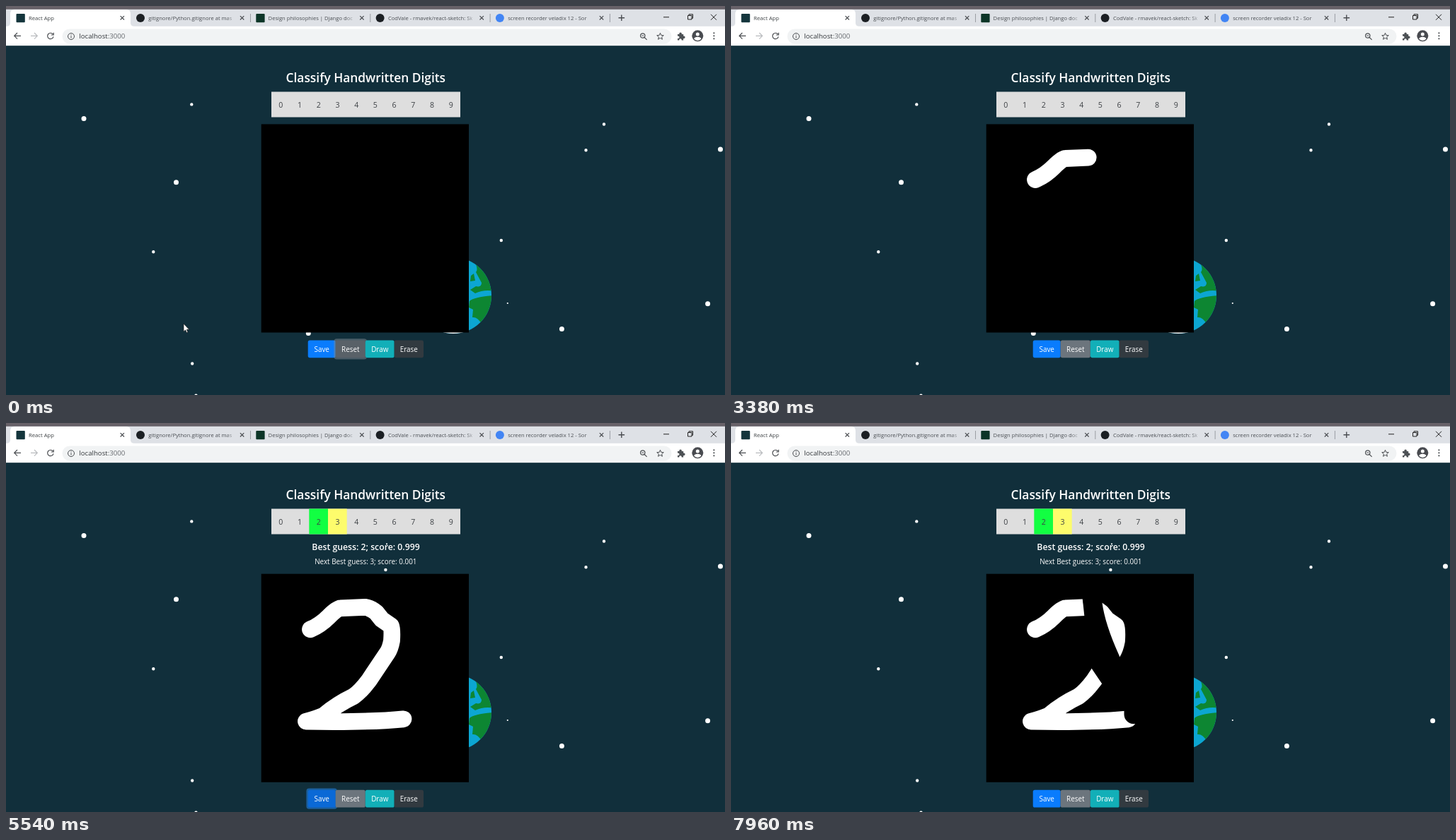
An HTML page that plays this animation: 1016x551 px, repeating every 8 s.

```html
<!DOCTYPE html>
<html lang="en">
<head>
<meta charset="utf-8">
<title>Digit classifier</title>
<style>
  html, body { margin: 0; width: 100%; height: 100%; overflow: hidden; background: #112f3b; }
  svg { display: block; width: 100%; height: 100%; }
  text { font-family: "Open Sans", "Noto Sans", sans-serif; white-space: pre; }
  .mid { text-anchor: middle; }
  .line { fill: none; stroke: #4a4d51; stroke-width: 1.2; }
  .dots { stroke: #fff; stroke-linecap: round; }
</style>
</head>
<body>
<svg viewBox="0 0 1016 551" xmlns="http://www.w3.org/2000/svg">
  <defs>
    <linearGradient id="fade">
      <stop offset="0" stop-color="#dee1e6" stop-opacity="0"/>
      <stop offset=".75" stop-color="#dee1e6"/>
    </linearGradient>
    <clipPath id="globe"><circle cx="632" cy="410" r="54"/></clipPath>
  </defs>

  <rect width="1016" height="551" fill="#112f3b"/>
  <path class="dots" stroke-width="7" d="M110 159.5h0M240.5 249.8h0M427.3 463.6h0M1009.5 203h0M991.6 421.8h0M785.4 457.4h0"/>
  <path class="dots" stroke-width="4.4" d="M262.3 139.4h0M208.3 348.3h0M263.2 506.5h0M268.5 551.8h0M845 167.5h0M819.5 204.3h0M699.8 332h0M536.4 208h0"/>
  <path class="dots" stroke-width="2.2" d="M708.8 421h0M538 171.3h0"/>

  <g clip-path="url(#globe)">
    <rect x="577" y="355" width="110" height="110" fill="#0ca6d2"/>
    <path fill="#0d8632" d="M664 366Q667 374 664 377L672 392Q672 399 664 397L656 402 663 407Q676 401 690 404V364Z
      M657 382L661 379 663 389 656 390ZM655 418Q662 412 690 410V440L672 450Q666 440 659 441L660 430 654 427Z"/>
    <ellipse cx="632" cy="468" rx="25" ry="9" fill="#fff"/>
  </g>

  <g id="chrome"></g>

  <text class="mid" x="508.3" y="107.7" font-size="17.35" font-weight="600" fill="#fff">Classify Handwritten Digits</text>
  <rect x="375" y="121.5" width="267" height="36" fill="#dedede"/>
  <g id="marks">
    <rect x="428.3" y="121.5" width="26.7" height="36" fill="#12ff42"/>
    <rect x="455" y="121.5" width="26.7" height="36" fill="#fdfc6c"/>
  </g>
  <g id="digits" font-size="10.6" fill="#3d4145"></g>
  <g id="scores" class="mid" fill="#fff">
    <text x="508.5" y="180" font-size="12.25" font-weight="600">Best guess: 2; score: 0.999</text>
    <text x="508.3" y="200" font-size="9.9">Next Best guess: 3; score: 0.001</text>
  </g>

  <g id="panel">
    <rect x="360.7" y="167.4" width="293.3" height="295.1"/>
    <g fill="none" stroke-linecap="round" stroke-linejoin="round">
      <path id="ink" pathLength="1" stroke="#fff" stroke-width="23.8"
        d="M430 246Q444 240 456 228T472 216L507 214.5Q516 216 523 222L531 232 544 241Q546 246 545 262 543 273 539 279L513 318Q501 334 491 341 468 352 449 368 440 372 424 376.4 510 378 561.5 373"/>
      <path id="wipe" pathLength="1" stroke="#000" stroke-width="27"
        d="M569 366.5V352L535 315 521.5 295Q515 250 510 199 512 235 536 288"/>
    </g>
    <g id="buttons"></g>
  </g>

  <path id="arrow" d="M0 0V11.2L2.6 8.9 4.3 12.8 6 12 4.4 8.3H7.8Z" fill="#fff" stroke="#1a1a1a" stroke-width=".7"/>
  <path id="hand" d="M-1.3 8V.8a1.2 1.2 0 0 1 2.4 0V5l4.4 1.2q1.3.4 1.1 2L5.8 13.6H0L-3.8 8.8q.4-1.7 2.5-.8Z" fill="#fff" stroke="#1a1a1a" stroke-width=".8"/>
</svg>

<script>
const LOOP = 8000;
const SHIFT = 46.3;    // the result lines push the panel down
const PRESS = { draw: 3110, drawn: 4600, save: 5300, result: 5500, erase: 7000, touch: 7300, wipe: 7500, wiped: 7950 };
const $ = id => document.getElementById(id);

// Eased pointer moves: start, end, x, y
const home = [251, 450];
const moves = [
  [50, 830, 1002, 72],
  [1300, 2050, 600, 250],
  [4620, 5020, 460.5, 485.3],
  [5860, 6130, 497, 532],
  [6520, 6850, 574, 531],
  [7130, 7300, 569, 413]
];

const buttons = [
  { name: "Save", w: 39, fill: "#0a7cfd", dark: "#0a69d6", ring: "#268fff", focus: [PRESS.save, PRESS.erase] },
  { name: "Reset", w: 42.1, fill: "#6c757d", dark: "#596168", ring: "#828a91", focus: [0, PRESS.draw] },
  { name: "Draw", w: 40.9, fill: "#12afb8", dark: "#138d9b", ring: "#3ab0c3", focus: [0, 0] },
  { name: "Erase", w: 41.3, fill: "#323a40", dark: "#23272b", ring: "#525960", focus: [PRESS.erase, PRESS.touch] }
];

const tabs = [
  "gitignore/Python.gitignore at mas",
  "Design philosophies | Django doc",
  "CodVale - rmavek/react-sketch: Sk",
  "screen recorder veladix 12 - Sor"
];

const cross = (x, y, r) => `M${x - r} ${y - r}l${2 * r} ${2 * r}m0 ${-2 * r}l${-2 * r} ${2 * r}`;
const disc = (x, y, r, fill) => `<circle cx="${x}" cy="${y}" r="${r}" fill="${fill}"/>`;
const box = (x, y, w, h, fill, r = 0) =>
  `<rect x="${x}" y="${y}" width="${w}" height="${h}" rx="${r}" fill="${fill}"/>`;
const label = (x, y, size, fill, s) => `<text x="${x}" y="${y}" font-size="${size}" fill="${fill}">${s}</text>`;
const line = (d, style = "") => `<path class="line" d="${d}" style="${style}"/>`;

function drawTabs() {
  let s = box(0, 0, 1016, 30, "#dee1e6") + box(0, 0, 1016, 4.8, "#676168") +
    box(0, 28.8, 1016, 27.4, "#fff") +
    `<path d="M0 29Q6 29 6 24V11Q6 5 12 5H170Q176 5 176 11V24Q176 29 182 29Z" fill="#fff"/>` +
    box(14.5, 11, 12.3, 12.3, "#14353c", 1) + label(32, 19.6, 7.7, "#3c4043", "React App") +
    line(cross(164.3, 16.8, 2.7));
  tabs.forEach((name, i) => {
    const x = 190 + i * 169.3;
    s += i == 1 ? box(x - 6, 11, 12.3, 12.3, "#0c3527", 1) : disc(x, 17, 6, i == 3 ? "#4285f4" : "#1b1f23");
    s += label(x + 11.3, 19.6, 7.6, "#4a4e53", name) + box(x + 121, 9, 18, 16, "url(#fade)") +
      line(cross(x + 143.6, 16.8, 2.7)) + box(x + 155, 11, 1, 12, "#9a9da3");
  });
  return s + line("M865.5 16.8h8.6M869.8 12.5v8.6", "stroke-width:1.4") +
    line("M929 15.8h8M963.5 13.5h5.5v5.5h-5.5zM965 13.5v-1.7h5.5v5.5h-1.5M996 11.8l8 8m0-8l-8 8", "stroke:#222;stroke-width:1");
}

function drawToolbar() {
  const star = Array.from({ length: 10 }, (_, i) => {
    const a = (i / 5 - .5) * Math.PI, r = i % 2 ? 2.2 : 5;
    return `${924.5 + r * Math.cos(a)} ${43.2 + r * Math.sin(a)}`;
  });
  return box(79.5, 32.5, 861, 21, "#f1f3f4", 10.5) +
    line("M21 42.3h-9M16 38l-4.3 4.3 4.3 4.3") +
    line("M35 42.3h9M40 38l4.3 4.3-4.3 4.3", "stroke:#b9bbbe") +
    line("M66.3 40A4.2 4.2 0 1 0 67 43.4M67.2 37.8v3.2h-3.4") +
    line("M87.5 43a4.5 4.5 0 1 0 9 0a4.5 4.5 0 1 0-9 0M92 42.4v3M92 40.2v1.1", "stroke-width:1") +
    label(103.3, 46.3, 9.65, "#33373b", 'localhost<tspan fill="#63676c">:3000</tspan>') +
    line("M896.6 42a3.2 3.2 0 1 0 6.4 0a3.2 3.2 0 1 0-6.4 0M902.2 44.4l3.4 3.4M898.3 42h3") +
    line(`M${star.join("L")}Z`, "stroke-width:1") +
    `<path fill="#4d5155" d="M949 40h2.4a1.8 1.8 0 1 1 3.4 0h2.4v2.6a1.8 1.8 0 1 1 0 3.4v2.5h-2.6a1.7 1.7 0 1 0-3.2 0h-2.4v-2.6a1.8 1.8 0 1 0 0-3.3z"/>` +
    disc(977.3, 42.3, 8, "#494b50") + disc(977.3, 40, 2.5, "#fff") +
    `<path d="M972.2 46.6a5.2 3.4 0 0 1 10.2 0a6.6 6.6 0 0 1-10.2 0" fill="#fff"/>` +
    [-4, 0, 4].map(d => disc(1000.4, 42.3 + d, 1.1, "#4d5155")).join("");
}

function addButtons() {
  let x = 426.7;
  for (const b of buttons) {
    b.x = x;
    $("buttons").insertAdjacentHTML("beforeend", "<g>" +
      box(x - 2.3, 471.2, b.w + 4.6, 29.2, b.ring, 4) +
      box(x, 473.5, b.w, 24.7, b.fill, 2.6) +
      `<text class="mid" x="${x + b.w / 2}" y="489.9" font-size="9.9" fill="#fff">${b.name}</text></g>`);
    [b.halo, b.face] = $("buttons").lastChild.children;
    x += b.w;
  }
}

$("chrome").innerHTML = drawTabs() + drawToolbar();
$("digits").innerHTML = Array.from({ length: 10 },
  (_, i) => `<text class="mid" x="${388.4 + i * 26.7}" y="144.2">${i}</text>`).join("");
addButtons();

const progress = (t, a, b) => Math.min(1, Math.max(0, (t - a) / (b - a)));
const smooth = p => p * p * (3 - 2 * p);
const show = (el, on) => el.setAttribute("visibility", on ? "visible" : "hidden");
const move = (el, x, y) => el.setAttribute("transform", `translate(${x} ${y})`);

function pointerAt(t) {
  return moves.reduce(([x, y], [a, b, tx, ty]) => {
    const p = smooth(progress(t, a, b));
    return [x + (tx - x) * p, y + (ty - y) * p];
  }, home);
}

function stroke(el, visible, p) {
  show(el, visible);
  el.setAttribute("stroke-dasharray", `${p} 2`);
}

function render(t) {
  const solved = t >= PRESS.result, dy = solved ? SHIFT : 0;
  show($("marks"), solved);
  show($("scores"), solved);
  move($("panel"), 0, dy);
  stroke($("ink"), t >= PRESS.draw, progress(t, PRESS.draw, PRESS.drawn));
  stroke($("wipe"), t >= PRESS.touch, progress(t, PRESS.wipe, PRESS.wiped));

  const [x, y] = pointerAt(t), py = y - dy;
  const onBoard = x > 360 && x < 654 && py > 167 && py < 463;
  let over = false;
  for (const b of buttons) {
    const hover = x >= b.x && x < b.x + b.w && py > 473 && py < 499;
    const focus = t >= b.focus[0] && t < b.focus[1];
    b.face.setAttribute("fill", hover || focus ? b.dark : b.fill);
    b.halo.setAttribute("opacity", focus ? .5 : 0);
    over = over || hover;
  }
  show($("hand"), over);
  show($("arrow"), !over && !onBoard);
  move($("hand"), x, y);
  move($("arrow"), x, y);
}

const start = performance.now();
function tick() {
  render((performance.now() - start) % LOOP);
  requestAnimationFrame(tick);
}
render(0);
requestAnimationFrame(tick);
</script>
</body>
</html>
```
